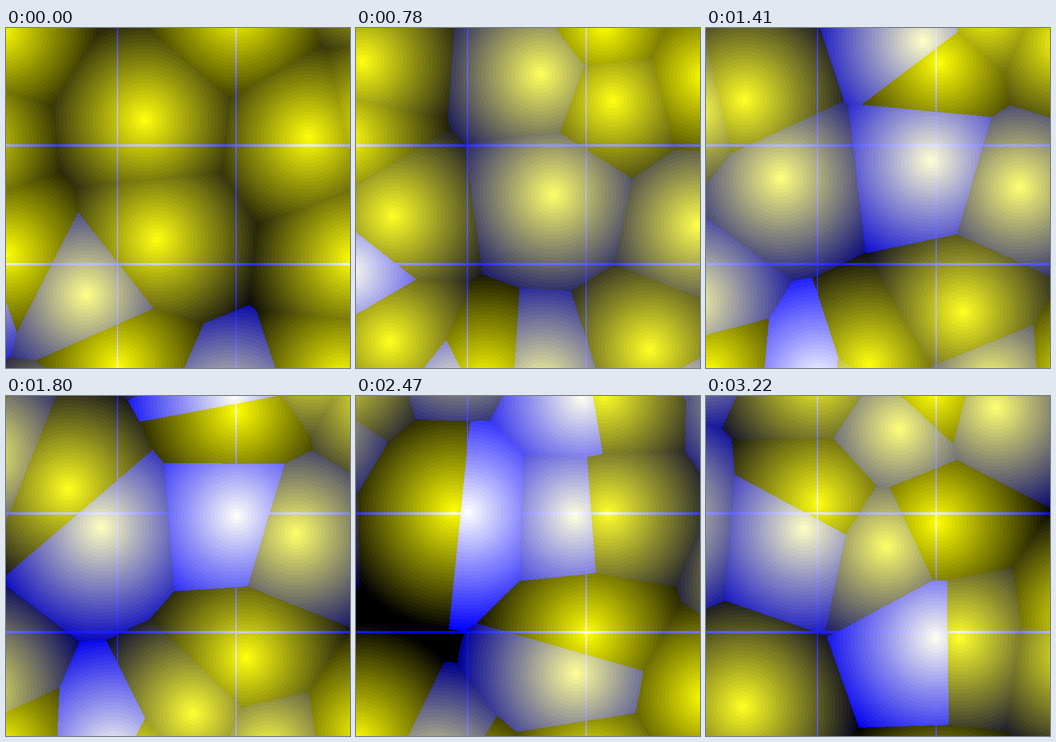
Animation, 580 px wide and 573 px high, one loop 3.24 s. Source, as an HTML page with a canvas:

```html
<!DOCTYPE html>
<html lang="en">
<head>
<meta charset="utf-8">
<title>Cellular noise</title>
<style>
html, body { margin: 0; width: 100%; height: 100%; overflow: hidden; background: #000; }
canvas { display: block; }
</style>
</head>
<body>
<canvas id="stage" width="580" height="573"></canvas>
<script>
const W = 580, H = 573;
const SIZE = 200, LEFT = -11, BOTTOM = 596;   // grid squares, counted from the lower left
const LOOP = 3240, PHASE = 2.66, SPEED = 1.04 / 1000, LEVELS = 32;

// Moments at which the picture advances, in ms.
const TICKS = [0, 120, 240, 360, 510, 660, 780, 900, 1020, 1140, 1290, 1410, 1530,
  1650, 1800, 1920, 2050, 2200, 2320, 2470, 2620, 2770, 2920, 3070, 3220];

const ctx = document.getElementById('stage').getContext('2d');
const image = ctx.createImageData(W, H);
const pixels = image.data.fill(255);

// Classic sine hash, kept in single precision because it amplifies rounding.
const f32 = Math.fround;
function hash(col, row, a, b) {
  const dot = f32(f32(col * f32(a)) + f32(row * f32(b)));
  const n = f32(f32(Math.sin(dot)) * f32(43758.5453));
  return n - Math.floor(n);
}

// Every square owns one point that swings inside it.
function makePoint(col, row, t) {
  const swing = seed => .5 + .5 * Math.sin(PHASE + t * SPEED + 2 * Math.PI * seed);
  const u = swing(hash(col, row, 127.1, 311.7));
  const v = swing(hash(col, row, 269.5, 183.3));
  return { x: LEFT + (col + u) * SIZE, y: BOTTOM - (row + v) * SIZE, blue: 255 * u * v };
}

function neighbours(col, row, t) {
  const list = [];
  for (let j = -1; j <= 1; j++) {
    for (let i = -1; i <= 1; i++) list.push(makePoint(col + i, row + j, t));
  }
  return list;
}

function drawSquare(col, row, t) {
  const points = neighbours(col, row, t);
  const x0 = LEFT + col * SIZE, x1 = x0 + SIZE;
  const y1 = BOTTOM - row * SIZE, y0 = y1 - SIZE;
  for (let y = Math.max(0, y0); y < Math.min(H, y1); y++) {
    for (let x = Math.max(0, x0); x < Math.min(W, x1); x++) {
      let best = SIZE * SIZE, light = 0, blue = 0;
      for (const p of points) {
        const dx = x + .5 - p.x, dy = y + .5 - p.y, d = dx * dx + dy * dy;
        if (d < best) { best = d; blue = p.blue; }
      }
      if (best < SIZE * SIZE) {
        const ring = Math.floor(Math.sqrt(best) / SIZE * LEVELS);
        light = 255 * (1 - (ring + .5) / LEVELS);
      }
      const onLine = y < y0 + 4 || x >= x1 - 2;
      const at = 4 * (y * W + x);
      pixels[at] = pixels[at + 1] = light;
      pixels[at + 2] = onLine ? 255 : blue;
    }
  }
}

function draw(t) {
  for (let row = 0; row < 3; row++) {
    for (let col = 0; col < 3; col++) drawSquare(col, row, t);
  }
  ctx.putImageData(image, 0, 0);
}

const start = performance.now();
let shown = -1;

function frame() {
  const t = (performance.now() - start) % LOOP;
  const tick = TICKS.findLast(ms => ms <= t);
  if (tick !== shown) draw(shown = tick);
  requestAnimationFrame(frame);
}
frame();
</script>
</body>
</html>
```
